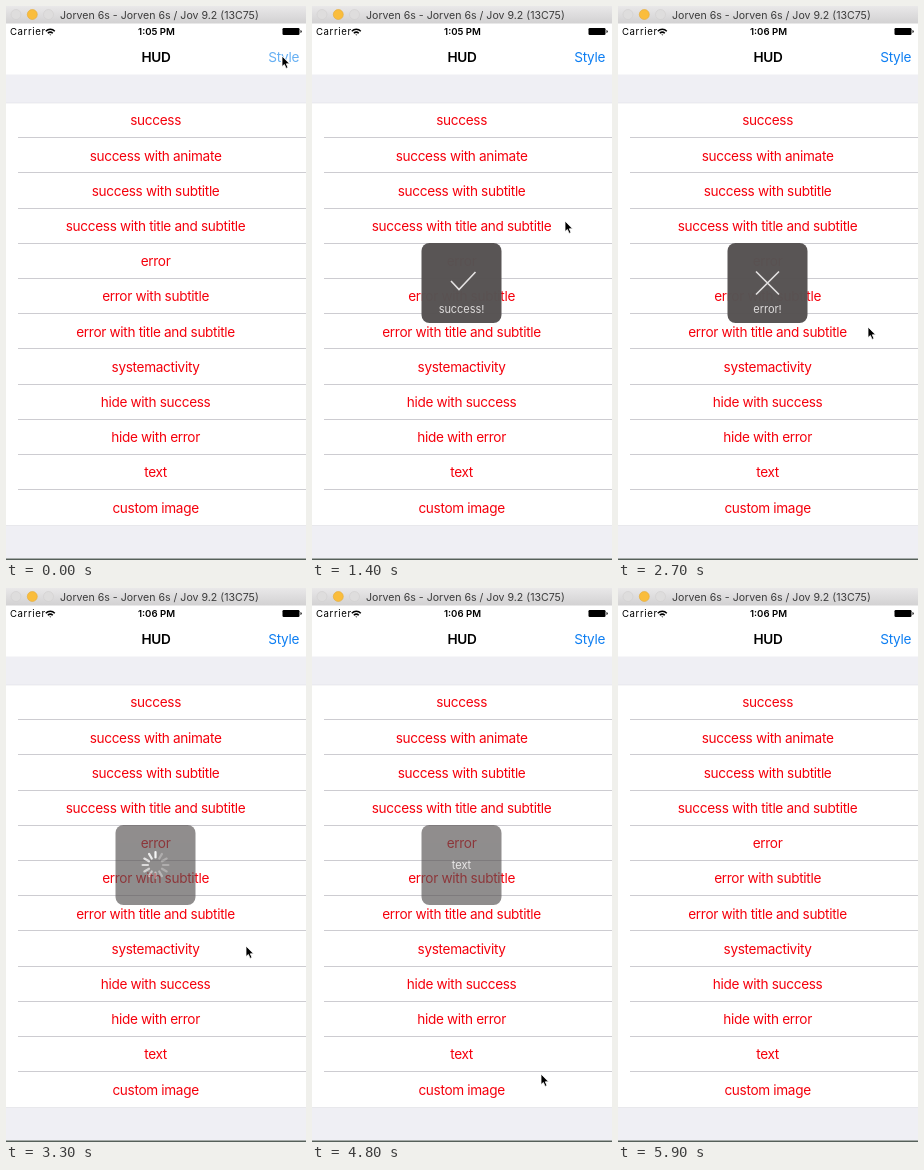
Recreate the animation shown at these times as an HTML page. Size 300 px wide and 554 px high, loop 6 s.

```html
<!DOCTYPE html>
<html lang="en">
<head>
<meta charset="utf-8">
<title>HUD demo</title>
<style>
  html, body { margin: 0; width: 100%; height: 100%; overflow: hidden; background: #fff; }
  svg { display: block; width: 100vw; height: 100vh; }
  text { font-family: Inter, Roboto, sans-serif; font-size: 13.6px; letter-spacing: -.32px; }
  .mid { text-anchor: middle; }
  .rows { fill: #f5000c; }
  .bold { font-weight: 600; }
  .small { font-size: 9.6px; letter-spacing: 0; }
  .label { font-size: 11px; letter-spacing: -.05px; fill: #dedcdc; }
  .mark { fill: none; stroke: #e4e2e2; stroke-width: 1.6; }
</style>
</head>
<body>
<svg id="stage" viewBox="0 0 300 554">
  <defs>
    <linearGradient id="bar" x2="0" y2="1">
      <stop stop-color="#e9e8e9"/><stop offset="1" stop-color="#d2d1d2"/>
    </linearGradient>
  </defs>
  <rect width="300" height="554" fill="#fff"/>
  <rect width="300" height="17.5" fill="url(#bar)"/>
  <g stroke-width=".6">
    <circle cx="10" cy="8.5" r="5" fill="#dedddd" stroke="#d0cfcf"/>
    <circle cx="26.3" cy="8.5" r="5" fill="#fabd3c" stroke="#e5a936"/>
    <circle cx="42.5" cy="8.5" r="5" fill="#dedddd" stroke="#d0cfcf"/>
  </g>
  <text x="54" y="12.6" fill="#3c3c3c" style="font-size:10.6px;letter-spacing:0">Jorven 6s - Jorven 6s / Jov 9.2 (13C75)</text>

  <text x="4" y="29" class="small" style="letter-spacing:.6px">Carrier</text>
  <g fill="none" stroke="#000" stroke-width="1.5">
    <path d="M39.8 25.2a6.4 6.4 0 0 1 9 0M41.8 27.3a3.6 3.6 0 0 1 5 0"/>
    <path d="M43.3 28.4h2l-1 1.2z" fill="#000" stroke="none"/>
  </g>
  <text id="clock" x="150.5" y="29" class="small mid bold"></text>
  <rect x="276.5" y="22" width="17" height="7" rx="1.2"/>
  <path d="M294.5 24v3q1.2-.3 1.2-1.5t-1.2-1.5z"/>

  <text x="150" y="56.3" class="mid bold">HUD</text>
  <text id="style" x="293" y="56.3" text-anchor="end">Style</text>

  <rect y="68.5" width="300" height="28.5" fill="#efeff4"/>
  <rect y="519.5" width="300" height="33" fill="#efeff4"/>
  <path d="M0 97h300M0 519.5h300" stroke="#e0e0e4" stroke-width=".6"/>
  <rect y="552.5" width="300" height="1.5" fill="#56605a"/>

  <rect id="pressed" width="300" height="35.2" fill="#e0e0e0"/>
  <g id="rows" class="rows"></g>
  <g id="hud"></g>
  <path id="cursor" d="M0 0V10.6L2.4 8.5 4.1 12.4 6 11.6 4.3 7.8H7.6Z" stroke="#fff" stroke-width=".8"/>
</svg>
<script>
const LOOP = 6000, STEP = 100, TOP = 97, ROW = 35.2, MID = 149.5;
const $ = id => document.getElementById(id);

const names = ['success', 'success with animate', 'success with subtitle',
  'success with title and subtitle', 'error', 'error with subtitle',
  'error with title and subtitle', 'systemactivity', 'hide with success',
  'hide with error', 'text', 'custom image'];

$('rows').innerHTML = names.map((name, i) => {
  const y = TOP + i * ROW;
  const line = i ? `<path d="M12 ${Math.round(y) - .5}H300" stroke="#c8c7cc" stroke-width=".9"/>` : '';
  return `${line}<text class="mid" x="149.6" y="${y + 22.4}">${name}</text>`;
}).join('');

// time, x, y of the pointer tip
const path = [[0, 276, 50], [300, 160, 112], [500, 154, 114], [700, 154, 144],
  [900, 154, 146], [1100, 214, 181], [1200, 216, 181], [1400, 253, 215],
  [1700, 253, 215], [2000, 240, 252], [2200, 240, 254], [2400, 246, 288],
  [2600, 250, 314], [2700, 250, 321], [2900, 250, 322], [3200, 240, 358],
  [3300, 240, 358], [3600, 232, 394], [3700, 232, 395], [4000, 224, 432],
  [4300, 224, 432], [4600, 228, 468], [4700, 228, 468], [4900, 230, 504],
  [5300, 230, 504], [5800, 180, 300]];

// row, pressed from, until
const taps = [[1, 800, 900], [2, 1100, 1200], [4, 2000, 2100], [5, 2400, 2500],
  [6, 2800, 2900], [7, 3200, 3300], [8, 3600, 3700], [11, 5000, 5300]];

const check = (y, age) => `<path class="mark" pathLength="1" stroke-dasharray="${Math.min(1, age)} 2"
  d="M139 ${y - 2}l8 8.6 16.5-17.6"/>`;
const cross = y => `<path class="mark" d="M138 ${y - 11.5}l23 23M161 ${y - 11.5}l-23 23"/>`;
const label = (s, y) => `<text class="label mid" x="${MID}" y="${y}">${s}</text>`;

const draw = {
  check: h => check(h.y, 1),
  animate: h => check(h.y, (h.age + 100) / 200),
  success: h => check(h.y, 1) + label('success!', h.y + 29.7),
  cross: h => cross(h.y),
  error: h => cross(h.y) + label('error!', h.y + 29.7),
  text: h => label('text', h.y + 4),
  activity(h) {
    const head = 9 + Math.round((h.t - 4200) / STEP);
    let s = '';
    for (let i = 0; i < 12; i++) {
      const lag = ((head - i) % 12 + 12) % 12;
      s += `<path d="M0-7.5v-5.4" transform="translate(${MID} ${h.y}) rotate(${i * 30})"
        stroke="#fff" stroke-width="2.2" stroke-linecap="round" opacity="${Math.max(.28, .92 - lag * .08)}"/>`;
    }
    return s;
  },
  ring(h) {
    const turn = Math.max(0, h.t - 5200) * .4;
    return `<g transform="translate(${MID} ${h.y}) rotate(${turn})" fill="none" stroke-width="2.2">
      <circle r="15.3" stroke="#393737"/>
      <path d="M0-15.3A15.3 15.3 0 0 1 13.2-7.6" stroke="#111"/></g>`;
  }
};

// kind, from, until, centre, corner
const huds = [['check', 400, 800, 328, 3], ['animate', 900, 1200], ['success', 1200, 1600],
  ['success', 1700, 2100], ['cross', 2100, 2400], ['error', 2400, 2900],
  ['error', 2900, 3200], ['activity', 3300, 3600], ['activity', 3700, 3900],
  ['success', 3900, 4100], ['activity', 4100, 4400], ['cross', 4400, 4700],
  ['text', 4700, 4900], ['ring', 4900, 5700]];

const active = (list, t) => list.find(([, from, to]) => t >= from && t < to);

function hudAt(t) {
  const item = active(huds, t);
  if (!item) return '';
  const [kind, from, to, y = 277, r = 8] = item;
  const fading = t < from + STEP || t >= to - STEP;
  return `<g opacity="${fading ? .67 : 1}">
    <rect x="${MID - 40}" y="${y - 40}" width="80" height="80" rx="${r}" fill="#575353" fill-opacity=".985"/>
    ${draw[kind]({ t, y, age: t - from })}</g>`;
}

function pointerAt(t) {
  const i = path.findIndex(p => p[0] > t);
  const [t0, x0, y0] = path[i < 0 ? path.length - 1 : i - 1];
  if (i < 0) return [x0, y0];
  const [t1, x1, y1] = path[i], k = (t - t0) / (t1 - t0);
  return [x0 + (x1 - x0) * k, y0 + (y1 - y0) * k];
}

function render(t) {
  $('clock').textContent = t < 1600 ? '1:05 PM' : '1:06 PM';
  $('style').setAttribute('fill', t < 100 ? '#67b0f3' : '#0f7ff2');

  const tap = active(taps, t);
  $('pressed').setAttribute('visibility', tap ? 'visible' : 'hidden');
  if (tap) $('pressed').setAttribute('y', TOP + tap[0] * ROW);

  $('hud').innerHTML = hudAt(t);
  $('cursor').setAttribute('transform', `translate(${pointerAt(t)})`);
  $('cursor').setAttribute('visibility', t < 5900 ? 'visible' : 'hidden');
}

const start = performance.now();
let last = -1;
function tick() {
  const t = Math.floor((performance.now() - start) % LOOP / STEP) * STEP;
  if (t !== last) render(last = t);
  requestAnimationFrame(tick);
}
tick();
</script>
</body>
</html>
```
